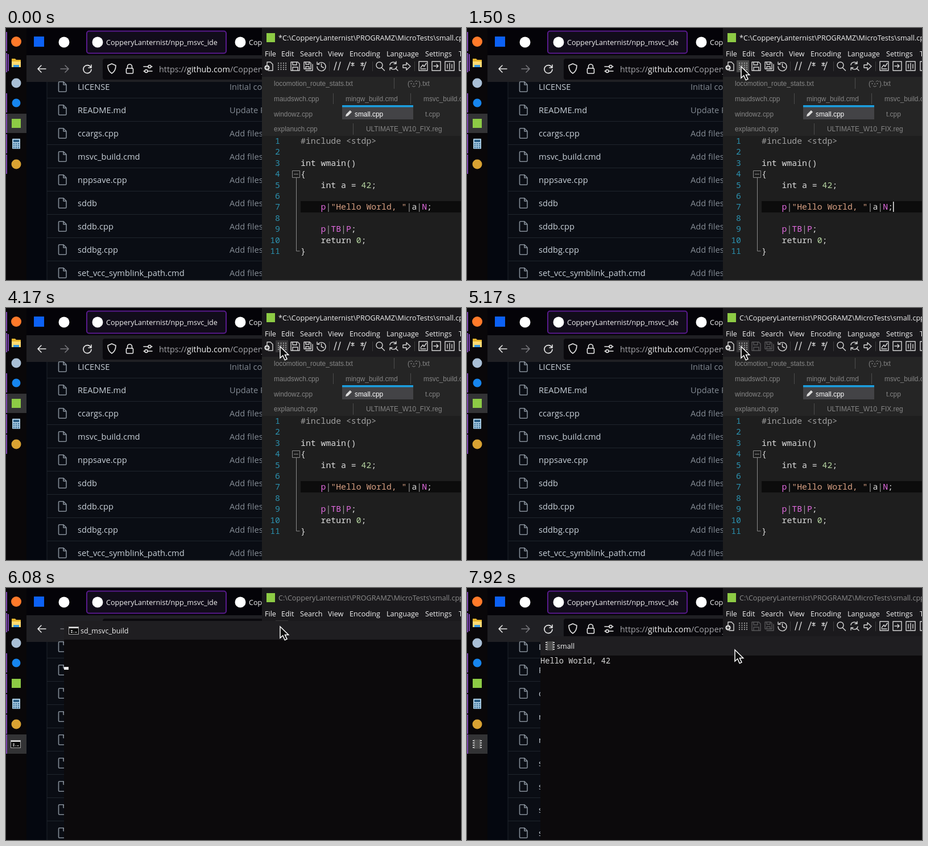
Animation, 800 px wide and 444 px high, one loop 8 s. Source, as an HTML page:

```html
<!DOCTYPE html>
<html lang="en">
<head>
<meta charset="utf-8">
<title>Build from the editor</title>
<style>
html, body { margin: 0; width: 100%; height: 100%; overflow: hidden; background: #000; }
svg { display: block; width: 800px; height: 444px; }
text { white-space: pre; font: 12.6px "Open Sans", "Noto Sans", sans-serif; fill: #f2f2f2; }
.repo text { font-size: 14.7px; fill: #c9d1d9; }
.repo .note { fill: #858c95; }
.url text { font-size: 14.4px; }
.tabs text { font: 11.9px "Liberation Sans", Arial, sans-serif; fill: #858585; }
.code text { font: 14.8px "Noto Sans Mono", "DejaVu Sans Mono", monospace; fill: #dcdcdc; }
.code .num { fill: #2b91af; text-anchor: end; }
.con { font: 13.7px "Noto Sans Mono", "DejaVu Sans Mono", monospace; fill: #d8d8d8; }
.line { fill: none; stroke: #e8e8e8; stroke-width: 1.6; stroke-linejoin: round; stroke-linecap: round; }
.code .pre { fill: #a0a0a0; } .code .str { fill: #d9a184; } .code .id { fill: #e26be0; } .code .val { fill: #b8d7a3; }

.dirty, .clean, .idle, .saves, .caret, .tip, .hover, .hover-clock, .on-editor, .on-cmd, .on-app {
  animation: 8s step-end infinite; }
.dirty { animation-name: dirty; }
.clean { animation-name: clean; }
.idle { animation-name: idle; }
.saves { animation-name: saves; }
.caret { animation-name: caret; }
.tip { animation-name: tip; }
.hover { animation-name: hover; }
.hover-clock { animation-name: hover-clock; }
.on-editor { animation-name: on-editor; }
.on-cmd { animation-name: on-cmd; }
.on-app { animation-name: on-app; }
.slide { animation: slide 8s linear infinite; }
.cmd { animation: cmd 8s linear infinite; }
.app { animation: app 8s linear infinite; }
.pointer { animation: pointer 8s linear infinite; }

@keyframes dirty { 0% { opacity: 1 } 62.5% { opacity: 0 } }
@keyframes clean { 0% { opacity: 0 } 62.5% { opacity: 1 } 66.6% { opacity: 0 } }
@keyframes idle { 0% { opacity: 0 } 66.6% { opacity: 1 } }
@keyframes saves { 0% { opacity: 1 } 62.5% { opacity: .32 } }
@keyframes caret {
  0%, 10.42%, 20.83%, 31.25%, 41.67%, 52.08%, 62.5% { opacity: 0 }
  5.21%, 15.62%, 26.04%, 36.46%, 46.87%, 57.29% { opacity: 1 }
}
@keyframes tip { 0%, 44.7% { opacity: 0 } 23.9% { opacity: 1 } }
@keyframes hover { 0%, 89.6% { opacity: 0 } 12% { opacity: 1 } 44.7% { opacity: .6 } 78% { opacity: 1 } }
@keyframes hover-clock { 0%, 10.4% { opacity: 0 } 8% { opacity: 1 } }
@keyframes on-editor { 0% { opacity: 1 } 66.6% { opacity: 0 } }
@keyframes on-cmd { 0%, 77.5% { opacity: 0 } 66.6% { opacity: 1 } }
@keyframes on-app { 0% { opacity: 0 } 78.1% { opacity: 1 } }
@keyframes slide {
  0%, 78.1% { transform: translateY(10px) }
  80.2% { transform: translateY(2px) }
  81.2%, 100% { transform: none }
}
@keyframes cmd {
  0%, 66.59% { opacity: 0 }
  66.6% { opacity: .95 }
  67.6%, 76.1% { opacity: 1 }
  77.1%, 100% { opacity: 0 }
}
@keyframes app { 0%, 77.4% { opacity: 0 } 79.2%, 100% { opacity: 1 } }
@keyframes pointer {
  0%, 2.5% { transform: translate(830px, 130px) }
  8% { transform: translate(560px, 67px) }
  9.37% { transform: translate(520px, 66px) }
  12.5%, 89% { transform: translate(482px, 68px) }
  94%, 100% { transform: translate(471px, 109px) }
}
</style>
</head>
<body>
<svg viewBox="0 0 800 444">
  <defs>
    <clipPath id="tabClip"><rect x="145" y="5" width="228" height="40"/></clipPath>
    <path id="doc" class="line" style="stroke:#848d97" d="M2 .8h7l5 5v11q0 1.500-1.500 1.500h-10.500q-1.500 0-1.500-1.500v-14.500q0-1.500 1.500-1.500zM9 1v5h5"/>
    <g id="chip">
      <path d="M-8-6h16M-8-2h16M-8 2h16M-8 6h16" stroke="#c4c4c4" stroke-width="2"/>
      <rect x="-5" y="-8" width="10" height="16" fill="#4a4a4a"/>
      <path d="M-5-8v16M5-8v16" stroke="#8c8c8c"/>
    </g>
    <g id="console">
      <rect x="-8.5" y="-6.5" width="17" height="13" fill="#080808" stroke="#aaa"/>
      <path d="M-8-5h16" stroke="#ddd" stroke-width="2"/>
      <path d="M-5 0h3M-5 3h3M0 3h1M3 3h2" stroke="#eee" stroke-width="1.4"/>
    </g>
  </defs>

  <!-- browser -->
  <rect x="36" width="420" height="48" fill="#040308"/>
  <rect x="36" y="48" width="420" height="47" fill="#202024"/>
  <rect x="49" y="15" width="18" height="18" fill="#0c61f5"/>
  <circle cx="102" cy="25" r="9.5" fill="#fff"/>
  <rect x="142" y="5.5" width="245" height="39" rx="4" fill="#110c1a" stroke="#581a8c" stroke-width="2"/>
  <circle cx="161" cy="25" r="9.5" fill="#fff"/>
  <circle cx="412" cy="25" r="9.5" fill="#fff"/>
  <text x="176" y="29.5" clip-path="url(#tabClip)">CopperyLanternist/npp_msvc_ide:</text>
  <text x="427" y="29.5">CopperyLanternist</text>
  <rect x="170" y="54" width="300" height="37" rx="4" fill="#0a090d"/>
  <g class="line">
    <path d="M70 72H56m6-6l-6 6 6 6"/>
    <path d="M96 72h14m-6-6l6 6-6 6" stroke="#77777c"/>
    <path d="M149 69a7 7 0 1 0 1 4M150 65v5h-5"/>
    <path d="M186 63l7 3c0 7-2 11-7 14-5-3-7-7-7-14z"/>
    <rect x="211.5" y="71" width="12" height="9" rx="1.5"/>
    <path d="M213.5 71v-3a4 4 0 0 1 8 0v3M242 68h8M255 68h2M242 76h2M249 76h8"/>
    <circle cx="252.5" cy="68" r="2.5"/><circle cx="246.5" cy="76" r="2.5"/>
  </g>
  <g class="url"><text x="269" y="77.5"><tspan fill="#a5a5aa">https://</tspan>github.com<tspan fill="#a5a5aa">/CopperyLanternist</tspan></text></g>
  <rect x="36" y="95" width="420" height="349" fill="#04070f"/>
  <rect x="72" y="95" width="384" height="349" fill="#0a0d14"/>
  <path d="M72 95v349" stroke="#1f252d"/>
  <g class="repo" id="repo"></g>

  <!-- editor -->
  <rect x="450" width="350" height="86" fill="#1b1a1d"/>
  <rect x="450" y="86" width="350" height="104" fill="#252525"/>
  <rect x="450" y="190" width="350" height="254" fill="#1e1e1e"/>
  <rect x="458" y="9" width="15" height="16" fill="#8dcb45"/>
  <text class="dirty" x="479" y="21.5">*C:\CopperyLanternist\PROGRAMZ\MicroTests\small.cpp</text>
  <text class="clean" x="479" y="21.5">C:\CopperyLanternist\PROGRAMZ\MicroTests\small.cpp</text>
  <g class="idle"><text x="479" y="21.5" style="fill:#8c8c8c">C:\CopperyLanternist\PROGRAMZ\MicroTests\small.cpp</text></g>
  <g id="menu"></g>

  <rect class="hover" x="474" y="57" width="22" height="21" fill="#4a4a4a"/>
  <g class="hover-clock" fill="#444"><rect x="521" y="57" width="20" height="21"/><rect x="544" y="57" width="21" height="21"/></g>
  <path d="M479 61v13M483.500 61v13M488 61v13M492 61v13" stroke="#999" stroke-width="2" stroke-dasharray="2 1.700"/>
  <path d="M568.5 59v17M644.5 59v17M718.5 59v17" stroke="#3c3c3c"/>
  <g class="line" style="stroke-width:1.4;stroke:#d5d5d5">
    <path d="M459 65v-5h6l4 4v11h-8"/>
    <circle cx="459" cy="70" r="4" fill="#ddd"/><path d="M457 70h4m-2-2v4" stroke="#222"/>
    <g class="saves">
      <path d="M501 60h12l3 3v12h-15zM504 60v5h7v-5M504 75v-6h9v6"/>
      <path d="M524 60h10l2 2v10h-12zM527 60v4h6v-4M527 72v-4h6v4M527 75h12v-11"/>
    </g>
    <path d="M549 63a7.5 7.5 0 1 1-2 5M547 60v4h4M554.5 63v5l4 2"/>
    <path d="M581 60l-4 14M588 60l-4 14M605 60l-5 14M633 60l-5 14M607 62l5 4m0-4l-5 4m2.5-5v6M624 62l5 4m0-4l-5 4m2.5-5v6"/>
    <circle cx="656.5" cy="65.5" r="5.5"/><path d="M660.5 70l5 5"/>
    <path d="M675 65a6 6 0 0 1 11-2M687 68a6 6 0 0 1-11 2M686 59v4h-4M675 74v-4h4M685 71l4 4"/>
    <path d="M698 65h6v-4l7 6.5-7 6.5v-4h-6z"/>
    <path d="M726 59h15v16h-15zM729 70l4-5 2 3 4-6M729 72h9M749 59h15v16h-15zM752 67h8m-3-3l3 3-3 3M772 59h16v16h-16zM776 64v7M780 62v11M784 64v7M797 59h8v16h-8z"/>
  </g>

  <g class="tabs" id="tabs">
    <path d="M682.5 88v19M575.5 115v19M711.5 115v19M610.5 168v20" stroke="#4d4d4d"/>
    <rect x="591" y="137" width="125" height="24" fill="#434346"/>
    <rect x="591" y="136" width="125" height="3.5" fill="#1b9fe0"/>
    <path d="M597 156l1-4 7-7 3 3-7 7z" fill="#ddd"/>
    <path d="M710 95q2.5-4 5 0M719 95q2.5-4 5 0M714 102q3 3 6 0M717 97v3" fill="none" stroke="#858585"/>
    <circle cx="712.5" cy="98" r="1" fill="#858585"/><circle cx="721.5" cy="98" r="1" fill="#858585"/>
  </g>

  <rect x="518" y="305" width="282" height="20" fill="#0c0c0c"/>
  <path d="M503.5 251.5h13v12h-13zM506 257.5h8M510.5 264v129h6" fill="none" stroke="#8a8a8a"/>
  <g class="code" id="code"></g>
  <rect class="caret" x="749" y="306" width="1.5" height="18" fill="#eee"/>
  <g class="tip">
    <rect x="482.5" y="91.5" width="88" height="21" fill="#2b2b2b" stroke="#868686"/>
    <text x="486" y="107" style="font-size:13.1px">Build C++ file</text>
  </g>

  <!-- console windows -->
  <g class="cmd">
    <rect x="102" y="58" width="698" height="33" fill="#1f1e21"/>
    <rect x="102" y="91" width="698" height="353" fill="#0c0a0c"/>
    <use href="#console" x="119" y="75"/>
    <text x="131" y="79.5">sd_msvc_build</text>
    <rect x="102" y="139" width="8" height="5" fill="#eee"/>
  </g>
  <g class="app">
    <rect x="129" y="85" width="671" height="34" fill="#1f1e21"/>
    <rect x="129" y="119" width="671" height="325" fill="#0c0a0c"/>
    <use href="#chip" x="146" y="102"/>
    <text x="158" y="107">small</text>
    <text class="con" x="129" y="132.5">Hello World, 42</text>
  </g>

  <!-- taskbar -->
  <rect width="36" height="444" fill="#090709"/>
  <g class="on-editor"><rect y="151" width="36" height="34" fill="#333335"/></g>
  <path d="M1 7v34M1 44v34M1 115v34M1 151v34M1 187v34M1 223v34M4 46v30" stroke="#7a45ad" stroke-width="2"/>
  <circle cx="18" cy="24" r="9" fill="#ff7a2a"/>
  <path d="M10 54h6l2 2h8v13h-16z" fill="#e8b62e"/><path d="M10 59h16v10h-16z" fill="#ffdc73"/><path d="M13 65h10v4h-10z" fill="#3d9be0"/>
  <circle cx="18" cy="97" r="8.5" fill="#a9bfd6"/>
  <circle cx="18" cy="132" r="7.5" fill="#1685ee"/>
  <rect x="10" y="160" width="16" height="16" fill="#8dcb45"/>
  <rect x="11" y="195" width="14" height="18" rx="1" fill="#a9cbe2"/>
  <rect x="13" y="197" width="10" height="4" fill="#2b5c83"/>
  <path d="M14 203v9M18 203v9M22 203v9" stroke="#396f98" stroke-width="2.5" stroke-dasharray="2 1.500"/>
  <circle cx="18" cy="240" r="8.5" fill="#d9a232"/>
  <g class="on-cmd">
    <rect y="258" width="36" height="34" fill="#333335"/><rect y="258" width="2" height="34" fill="#7a45ad"/>
    <use href="#console" x="17" y="275"/>
  </g>
  <g class="on-app"><g class="slide">
    <rect y="258" width="36" height="34" fill="#333335"/><rect y="258" width="2" height="34" fill="#7a45ad"/>
    <use href="#chip" x="18" y="275"/>
  </g></g>

  <path class="pointer" d="M0 0v20l4.7-4.3 3.6 8 3.7-1.7-3.6-7.6h6.3z" fill="#0b0b0b" stroke="#fff" stroke-width="1.5"/>
</svg>
<script>
const add = (id, markup) => document.getElementById(id).insertAdjacentHTML('beforeend', markup);
const label = (x, y, body, cls = '') => `<text x="${x}" y="${y}" class="${cls}">${body}</text>`;

const files = ['LICENSE', 'README.md', 'ccargs.cpp', 'msvc_build.cmd', 'nppsave.cpp',
  'sddb', 'sddb.cpp', 'sddbg.cpp', 'set_vcc_symblink_path.cmd'];
const notes = ['Initial commit', 'Update README.md'];
files.forEach((name, i) => {
  const y = 103.5 + 41 * i;
  add('repo', `<use href="#doc" x="92" y="${y - 9.5}"/>` + label(126, y + 5, name) +
    label(393, y + 5, notes[i] || 'Add files via upload', 'note') +
    `<path d="M72 ${y + 20}h384" stroke="#1f252d"/>`);
});

const menu = { File: 455, Edit: 484, Search: 517, View: 566, Encoding: 604, Language: 669, Settings: 737, Tools: 796 };
for (const [name, x] of Object.entries(menu)) add('menu', label(x, 50, name));

const tabs = [
  [471, 102, 'locomotion_route_stats.txt'], [706, 102, '('], [725, 102, ').txt'],
  [471, 129, 'maudswch.cpp'], [597, 129, 'mingw_build.cmd'], [734, 129, 'msvc_build.cmd'],
  [471, 156, 'windowz.cpp'], [737, 156, 't.cpp'],
  [471, 182, 'explanuch.cpp'], [633, 182, 'ULTIMATE_W10_FIX.reg']
];
tabs.forEach(tab => add('tabs', label(...tab)));
add('tabs', '<text x="613" y="156" style="fill:#fff">small.cpp</text>');

const tint = (cls, body) => `<tspan class="${cls}">${body}</tspan>`;
const bar = tint('pre', '|');
const code = [
  tint('pre', '#include &lt;stdp&gt;'), '', 'int wmain()', '{',
  `    int a = ${tint('val', 42)};`, '',
  `    ${tint('id', 'p')}${bar}${tint('str', '"Hello World, "')}${bar}a${bar}${tint('id', 'N')};`, '',
  `    ${tint('id', 'p')}${bar}${tint('id', 'TB')}${bar}${tint('id', 'P')};`,
  `    return ${tint('val', 0)};`, '}'
];
code.forEach((body, i) => {
  const y = 204 + 19.4 * i;
  add('code', label(482, y, i + 1, 'num') + label(518, y, body));
});
</script>
</body>
</html>
```
